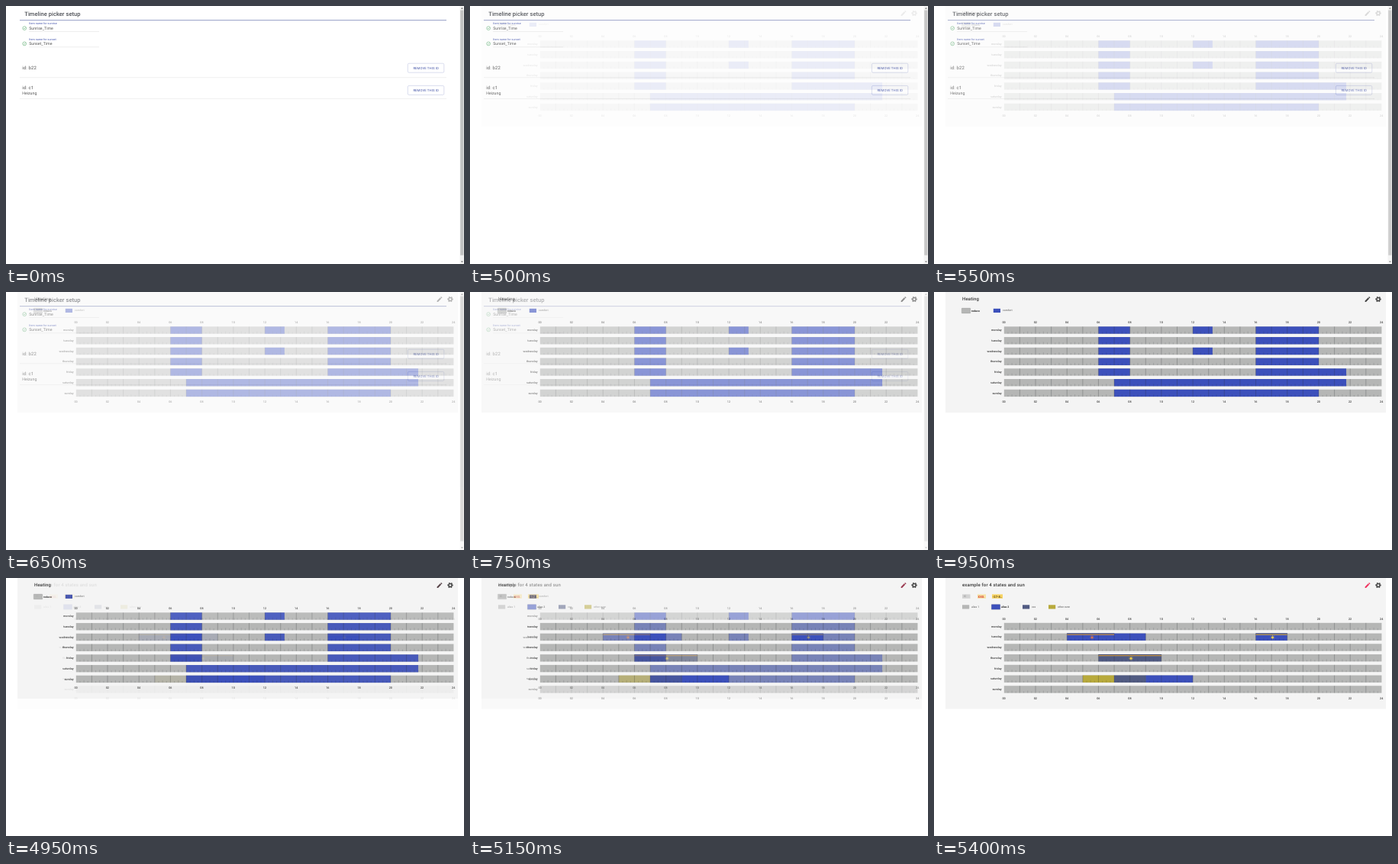
An HTML page for the animation above (8 s loop, 600 px wide and 338 px high).

```html
<!DOCTYPE html>
<html lang="en">
<head>
<meta charset="utf-8">
<title>Timeline picker</title>
<style>
  html, body { margin: 0; width: 100%; height: 100%; overflow: hidden; background: #fff; }
  svg { position: absolute; inset: 0; width: 100%; height: 100%; display: block; }
  text { font-family: Roboto, Arial, sans-serif; text-rendering: geometricPrecision; white-space: pre; }
</style>
</head>
<body>
<script>
const GREY = '#b5b6b5', BLUE = '#3c50bb', SLATE = '#515b82', OLIVE = '#b8aa3c', INK = '#383838';
const LEFT = 91.8, HOUR = 20.61, BAR = 9.4, PITCH = 13.74;
const DAYS = ['monday', 'tuesday', 'wednesday', 'thursday', 'friday', 'saturday', 'sunday'];

const hourX = h => LEFT + h * HOUR;
const rect = (x, y, w, h, fill, more = '') =>
  `<rect x="${x}" y="${y}" width="${w}" height="${h}" fill="${fill}" ${more}/>`;
const path = (d, color, width) =>
  `<path d="${d}" fill="none" stroke="${color}" stroke-width="${width}"/>`;
const text = (x, y, str, size, { fill = INK, weight = 400, anchor = 'start', gap = 0 } = {}) =>
  `<text x="${x}" y="${y}" font-size="${size}" fill="${fill}" font-weight="${weight}" ` +
  `text-anchor="${anchor}" letter-spacing="${gap}">${str}</text>`;

const icon = (cx, cy, body) => `<g transform="translate(${cx - 4.5} ${cy - 4.5}) scale(.375)">${body}</g>`;

const pencil = color => icon(568, 9.5,
  `<path fill="${color}" d="M3 17.25V21h3.75L17.8 9.94l-3.75-3.75zM20.7 7.04a1 1 0 0 0 0-1.41
   l-2.34-2.34a1 1 0 0 0-1.41 0l-1.83 1.83 3.75 3.75z"/>`);

function gear() {
  const tooth = Math.PI * 8.4 / 6;
  return icon(582, 9.5,
    `<g fill="none" stroke="#444"><circle cx="12" cy="12" r="5.6" stroke-width="4"/>
     <circle cx="12" cy="12" r="8.4" stroke-width="3" stroke-dasharray="${tooth} ${tooth}"
       transform="rotate(${-tooth / 2 / 8.4 * 180 / Math.PI} 12 12)"/></g>`);
}

function sun(cx, cy, color) {
  let rays = '';
  for (let i = 0; i < 8; i++) {
    const a = i * Math.PI / 4, c = Math.cos(a), s = Math.sin(a);
    rays += `M${cx + c * 1.7} ${cy + s * 1.7}L${cx + c * 2.7} ${cy + s * 2.7}`;
  }
  return `<circle cx="${cx}" cy="${cy}" r="1.5" fill="${color}"/>` + path(rays, color, .6);
}

// Blocks are [day, from hour, to hour, color].
function timeline(mid, blocks, overlay = '') {
  let out = '', hours = '', halves = '', quarters = '';
  const top = mid - BAR / 2, rowTop = d => top + d * PITCH;
  DAYS.forEach((day, d) => {
    const y = rowTop(d), end = y + BAR;
    out += text(88.5, y + BAR / 2 + 1.1, day, 3.75, { weight: 500, anchor: 'end' });
    out += rect(LEFT, y, HOUR * 24, BAR, GREY);
    for (let q = 1; q < 96; q++) {
      const x = hourX(q / 4);
      if (q % 4 === 0) hours += `M${x} ${y}V${end}`;
      else if (q % 2 === 0) halves += `M${x} ${end - 3}V${end}`;
      else quarters += `M${x} ${end - 2.2}V${end}`;
    }
  });
  for (const [d, from, to, color] of blocks)
    out += rect(hourX(from), rowTop(d), (to - from) * HOUR, BAR, color);
  out += path(hours, 'rgba(40,45,50,.5)', .5);
  out += path(halves + quarters, 'rgba(40,45,50,.42)', .38);
  for (let h = 0; h <= 24; h += 2)
    for (const y of [mid - 8.8, mid + 6 * PITCH + 13])
      out += text(hourX(h) - .2, y, String(h).padStart(2, '0'), 3.75, { weight: 500, anchor: 'middle' });
  return out + overlay;
}

function legend(x, y, color, label, textX, active) {
  const swatch = active
    ? rect(x, y - 3.4, 11.6, 6.8, color, 'rx=".6" stroke="#888" stroke-width=".25"')
    : rect(x, y - 2.6, 9.2, 5.2, color);
  return swatch + text(textX, y + 1, label, 3.5,
    active ? { weight: 700, fill: '#222' } : { fill: '#555' });
}

const card = (height, title, pen) =>
  rect(0, 0, 600, 338, '#fff') + rect(15, 0, 577, height, '#f4f4f4') +
  text(37, 11.2, title, 6, { weight: 500, gap: .15 }) + pencil(pen) + gear();

function field(y, label, value) {
  return text(30.2, y - 4.8, label, 3.75, { fill: '#4a5ab0' }) +
    text(30.2, y + 1.8, value, 5.25, { fill: '#555' }) +
    rect(30, y + 4.3, 92, .4, '#d4d4d4') +
    `<circle cx="24.2" cy="${y}" r="2.4" fill="none" stroke="#52a868" stroke-width=".55"/>` +
    path(`M23 ${y}l.9 .9l1.7 -1.8`, '#52a868', .55);
}

const button = y =>
  rect(526.4, y - 6, 47.4, 12, '#fff', 'rx="1.5" stroke="#b4bbdc" stroke-width=".5"') +
  text(550.1, y + 1.5, 'REMOVE THIS ID', 4.3, { fill: '#4656a8', anchor: 'middle', gap: .08 });

function setup() {
  const row = { fill: '#555', gap: .15 };
  return rect(0, 0, 600, 338, '#fff') +
    text(24.3, 13.2, 'Timeline picker setup', 7.5, { weight: 500, fill: '#4c4f55', gap: .05 }) +
    rect(18, 18.3, 559, .8, '#7d87b8') +
    field(29.1, 'Item name for sunrise', 'Sunrise_Time') +
    field(49.4, 'Item name for sunset', 'Sunset_Time') +
    text(21.2, 82.6, 'id: b22', 6, row) + button(81.2) +
    rect(18, 93.6, 559, .5, '#e0e0e0') +
    text(21.2, 108.6, 'id: c1', 6, row) + text(21.2, 115.6, 'Heizung', 5.25, { fill: '#555' }) +
    button(110.4) + rect(18, 121.3, 559, .5, '#e0e0e0') +
    rect(594.6, 0, 5.4, 338, '#f1f1f1') + rect(595.2, 5.5, 4.2, 321, '#c1c1c1') +
    '<path d="M596 3.8h2.8l-1.4-1.7zM596 334.3h2.8l-1.4 1.7z" fill="#666"/>';
}

function heating() {
  const blocks = [];
  for (let d = 0; d < 5; d++) {
    blocks.push([d, 6, 8, BLUE], [d, 16, d === 4 ? 21.75 : 20, BLUE]);
    if (d === 0 || d === 2) blocks.push([d, 12, 13.25, BLUE]);
  }
  blocks.push([5, 7, 21.75, BLUE], [6, 7, 20, BLUE]);
  return card(158, 'Heating', '#444') +
    legend(36.2, 24.5, GREY, 'reduce', 49, true) +
    legend(77.8, 24.4, BLUE, 'comfort', 90, false) +
    timeline(50, blocks);
}

function example() {
  const mid = 63.5, rowY = d => mid + d * PITCH;
  const sunSpan = (d, from, to, line, at, color) =>
    rect(hourX(from), rowY(d) - BAR / 2, (to - from) * HOUR, 1.2, '#3e466b') +
    rect(hourX(from), rowY(d) - 3.6, (to - from) * HOUR, 1.1, line) +
    sun(at, rowY(d) + .5, color);
  const chips =
    rect(37, 21.4, 10.5, 5.4, '#d3d3d3') + text(39, 25.3, 'IC', 3.5, { fill: '#888' }) +
    rect(57, 21.4, 11, 5.4, '#f7e3a5') +
    text(57.6, 25.6, 'XXX.', 4, { fill: '#d8362e', weight: 700 }) +
    rect(76, 21.4, 14, 5.4, '#f8d463') +
    text(76.8, 25.5, '-27-8..', 4, { fill: '#5d4a20', weight: 700 });
  return card(171.5, 'example for 4 states and sun', '#f0325f') + chips +
    legend(37, 37.9, GREY, 'alias 1', 49, false) +
    legend(75.2, 37.9, BLUE, 'alias 2', 88, true) +
    legend(116, 37.9, SLATE, 'xxx', 128, false) +
    legend(150, 37.9, OLIVE, 'other even', 162, false) +
    timeline(mid, [
      [1, 4, 9, BLUE], [1, 16, 18, BLUE], [3, 6, 10, SLATE],
      [5, 5, 7, OLIVE], [5, 7, 9, SLATE], [5, 9, 12, BLUE]
    ],
    sunSpan(1, 4, 7, '#d99a45', 207, '#d9764a') +
    sunSpan(1, 16, 18, '#d9ad45', 443.5, '#f5d348') +
    sunSpan(3, 6, 10, '#d99f45', 258, '#f5d348'));
}

document.body.innerHTML =
  `<svg viewBox="0 0 600 338" preserveAspectRatio="none">
   <g>${setup()}</g><g class="fade">${heating()}</g><g class="fade">${example()}</g></svg>`;

const LOOP = 8000, STEP = 50, STEPS = 10;
const fades = [...document.querySelectorAll('.fade')].map((node, i) => ({ node, start: [500, 4950][i] }));
const began = performance.now();

function draw(now) {
  const t = Math.max(0, now - began) % LOOP;
  for (const { node, start } of fades) {
    const k = Math.floor((t - start) / STEP) + 1;
    node.setAttribute('opacity', Math.min(STEPS, Math.max(0, k)) / STEPS);
  }
  requestAnimationFrame(draw);
}
draw(began);
</script>
</body>
</html>
```
